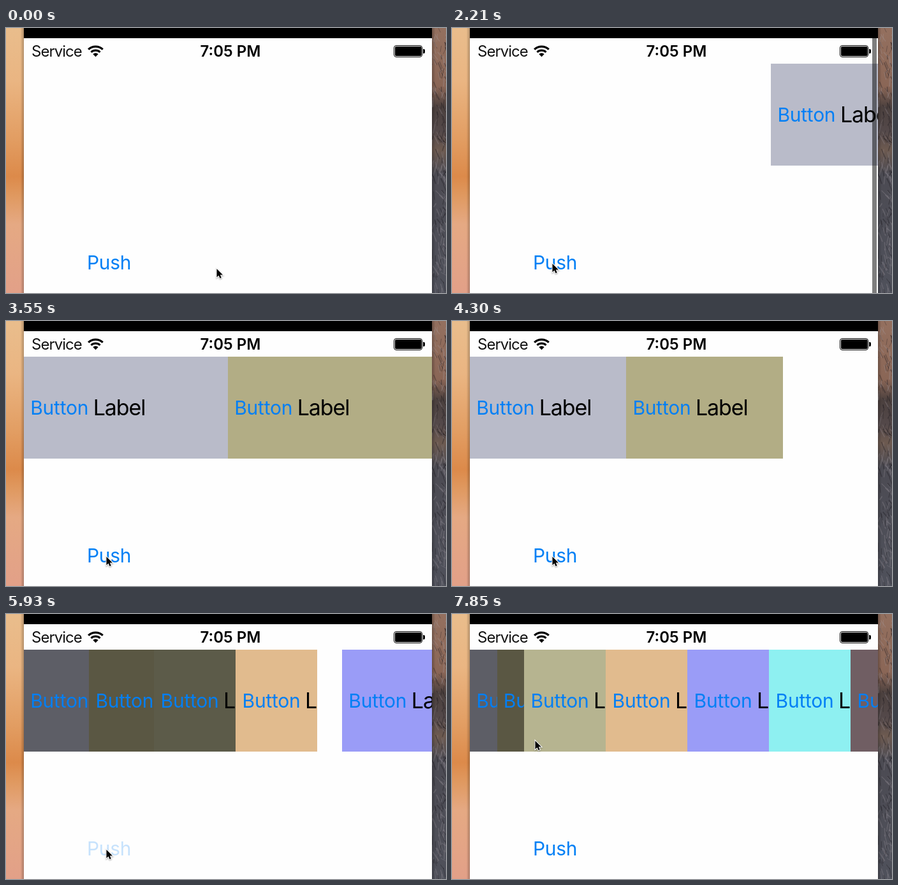
An HTML page with a canvas for the animation above (8 s loop, 690 px wide and 416 px high).

```html
<!DOCTYPE html>
<html lang="en">
<head>
<meta charset="utf-8">
<title>Push panels</title>
<style>
  html, body { margin: 0; width: 100%; height: 100%; overflow: hidden; }
  canvas { display: block; }
</style>
</head>
<body>
<canvas id="stage" width="690" height="416"></canvas>
<script>
const ctx = document.getElementById('stage').getContext('2d');
const LOOP = 8000, STEP = 148.1, LAST_STEP = 53;
const LEFT = 28, RIGHT = 668, TOP = 56, PANEL_H = 160, WIDE = 128;
const MOVE = 200; // ms for one shift or one slide-in
const BLUE = '#007ff5';

const colors = [[185, 187, 201], [178, 173, 133], [182, 180, 144], [225, 187, 142],
                [154, 156, 247], [142, 240, 241], [222, 187, 197], [220, 158, 230]];

// press: finger down; start: layout begins to move; n panels, first open panel s
const events = [
  [1760, 1954.4], [2950, 3110], [3990, 4167.5], [4880, 5030],
  [5470, 5597], [5760, 5837], [5915, 6080], [6210, 6320]
].map(([press, start], i) => ({ press, start, n: i + 1, s: Math.max(0, i - 3), push: true }));
events.push({ press: 7200, start: 7200, n: 8, s: 3 }, { press: 7500, start: 7500, n: 8, s: 2 });

const pointerPath = [
  [430, 330, 377], [720, 285, 335], [900, 236, 328], [1110, 183, 346], [1325, 157, 369],
  [6500, 157, 369], [6660, 157, 371], [6960, 143, 225], [7110, 136, 203], [7400, 130, 198]
];

const clamp = v => Math.max(0, Math.min(1, v));
const ease = v => { v = clamp(v); return v * v * (3 - 2 * v); };

function slot(i, { n, s }) {
  if (n <= 4) return { x: LEFT + i * 640 / n, w: 640 / n };
  const right = Math.min(1, n - 4 - s);
  const left = Math.min(s, 3 - right);
  const thin = WIDE / (left + right);
  const open = LEFT + left * thin;
  if (i < s) return { x: LEFT + Math.max(0, i - s + left) * thin, w: thin };
  if (i < s + 4) return { x: open + (i - s) * WIDE, w: WIDE };
  return { x: open + 4 * WIDE + (i - s - 4) * thin, w: thin };
}

// Later shifts add up on top of a slide-in that may still be running.
function panelBox(i, t) {
  const slide = ease((t - events[i].start - MOVE) / MOVE);
  if (slide === 0) return null;
  const home = slot(i, events[i]);
  let x = home.x + (RIGHT - home.x) * (1 - slide), w = home.w;
  for (let k = i + 1; k < events.length; k++) {
    const p = ease((t - events[k].start) / MOVE);
    const from = slot(i, events[k - 1]), to = slot(i, events[k]);
    x += (to.x - from.x) * p;
    w += (to.w - from.w) * p;
  }
  return { x, w: slide < 1 ? Math.max(w, RIGHT - x) : w };
}

function text(str, x, y, size, color, { weight = 400, spacing = 0, align = 'left' } = {}) {
  ctx.font = `${weight} ${size}px Inter, Roboto, sans-serif`;
  ctx.letterSpacing = spacing + 'px';
  ctx.textAlign = align;
  ctx.fillStyle = color;
  ctx.fillText(str, x, y);
}

function rect(color, x, y, w, h) {
  ctx.fillStyle = color;
  ctx.fillRect(x, y, w, h);
}

function gradient(stops) {
  const g = ctx.createLinearGradient(0, 0, 0, 416);
  stops.forEach(([at, color]) => g.addColorStop(at, color));
  return g;
}

function drawWallpaper() {
  rect(gradient([[0, '#e9bd8c'], [0.2, '#eab582'], [0.42, '#e29d62'], [0.56, '#dc8a4a'],
    [0.64, '#e09a62'], [0.74, '#e5a983'], [1, '#e2a088']]), 0, 0, LEFT, 416);
  rect(gradient([[0, '#94705f'], [0.22, '#8a6656'], [0.3, '#4b403e'], [0.39, '#54494a'],
    [0.46, '#6d5a50'], [0.55, '#4c4b53'], [1, '#4f515b']]), RIGHT, 0, 22, 416);
  let seed = 7;
  const random = () => (seed = seed * 16807 % 2147483647) / 2147483647;
  ctx.save();
  ctx.beginPath();
  ctx.rect(RIGHT, 0, 22, 416);
  ctx.clip();
  for (let i = 0; i < 190; i++) {
    const x = RIGHT + random() * 22, y = random() * 416, len = 5 + random() * 11;
    ctx.strokeStyle = random() < 0.5 ? 'rgba(25,22,28,.35)' : 'rgba(170,165,170,.25)';
    ctx.lineWidth = 0.8 + random();
    ctx.beginPath();
    ctx.moveTo(x, y);
    ctx.lineTo(x + (random() - 0.3) * 14, y + len);
    ctx.stroke();
  }
  ctx.restore();
  for (let d = 0; d < 5; d++) {
    const shade = `rgba(0,0,0,${0.22 - d * 0.045})`;
    rect(shade, LEFT - 1 - d, 0, 1, 416);
    rect(shade, RIGHT + d, 0, 1, 416);
  }
}

function drawStatusBar() {
  rect('#000', LEFT, 0, 640, 16);
  text('Service', 40, 45, 24, '#111', { spacing: -1 });
  text('7:05 PM', 352, 45, 24, '#000', { weight: 600, align: 'center' });

  ctx.fillStyle = '#000';
  for (const [inner, outer] of [[0, 6], [8.6, 11.7], [14.6, 17.8]]) {
    ctx.beginPath();
    ctx.arc(140.5, 45.3, outer, -Math.PI * 0.745, -Math.PI * 0.255);
    ctx.arc(140.5, 45.3, inner, -Math.PI * 0.255, -Math.PI * 0.745, true);
    ctx.fill();
  }

  ctx.strokeStyle = '#000';
  ctx.lineWidth = 1;
  ctx.beginPath();
  ctx.roundRect(608.5, 27.5, 44, 18, 3.5);
  ctx.stroke();
  ctx.beginPath();
  ctx.roundRect(610, 29, 41.5, 15, 2);
  ctx.roundRect(654, 33, 3, 7, [0, 2, 2, 0]);
  ctx.fill();
}

function drawPanel(i, { x, w }, dimmed) {
  ctx.save();
  ctx.beginPath();
  ctx.rect(Math.round(x), TOP, Math.round(x + w) - Math.round(x), PANEL_H);
  ctx.clip();
  rect(`rgb(${colors[i].map(c => c * (dimmed ? 0.505 : 1))})`, x - 1, TOP, w + 2, PANEL_H);
  text('Button', x + 10.2, 147, 30, BLUE, { spacing: -0.25 });
  text('Label', x + 108.7, 148, 34, '#000', { spacing: -1.1 });
  ctx.restore();
}

function pushAlpha(t) {
  const touch = events.filter(e => e.push && e.press <= t).pop();
  if (!touch) return 1;
  return t < touch.start ? 0.22 : 0.22 + 0.78 * clamp((t - touch.start) / 100);
}

function drawPointer(t) {
  let k = pointerPath.findIndex(p => p[0] > t);
  if (k < 0) k = pointerPath.length;
  const a = pointerPath[Math.max(0, k - 1)];
  const b = pointerPath[Math.min(k, pointerPath.length - 1)];
  const p = a === b ? 0 : (t - a[0]) / (b[0] - a[0]);
  ctx.save();
  ctx.translate(a[1] + (b[1] - a[1]) * p, a[2] + (b[2] - a[2]) * p);
  const arrow = new Path2D('M.5 1V14.2L3.6 11.4 5.6 16 7.8 15 5.8 10.5H10Z');
  ctx.shadowColor = 'rgba(0,0,0,.35)';
  ctx.shadowBlur = 2;
  ctx.shadowOffsetY = 1;
  ctx.strokeStyle = '#fff';
  ctx.lineWidth = 2;
  ctx.stroke(arrow);
  ctx.shadowColor = 'transparent';
  ctx.fillStyle = '#000';
  ctx.fill(arrow);
  ctx.restore();
}

function draw(t) {
  drawWallpaper();
  rect('#fefefe', LEFT, 0, 640, 416);
  drawStatusBar();

  ctx.save();
  ctx.beginPath();
  ctx.rect(LEFT, TOP, 640, 360);
  ctx.clip();
  const state = events.filter(e => e.press <= t).pop();
  colors.forEach((_, i) => {
    const box = panelBox(i, t);
    if (box) drawPanel(i, box, i < state.s || i >= state.s + 4);
  });
  ctx.globalAlpha = pushAlpha(t);
  text('Push', 127, 379, 30, BLUE, { spacing: -0.3 });
  ctx.restore();

  // scroll bar that shows for a moment
  if (t > 2050 && t < 2500) rect('rgba(0,0,0,.5)', 659, 0, 7, 416);
  drawPointer(t);
}

// The picture advances in even steps, as in a screen recording.
function tick(now) {
  const t = now % LOOP;
  draw(Math.min(LAST_STEP, Math.floor((t + 12) / STEP)) * STEP);
  requestAnimationFrame(tick);
}
requestAnimationFrame(tick);
</script>
</body>
</html>
```
